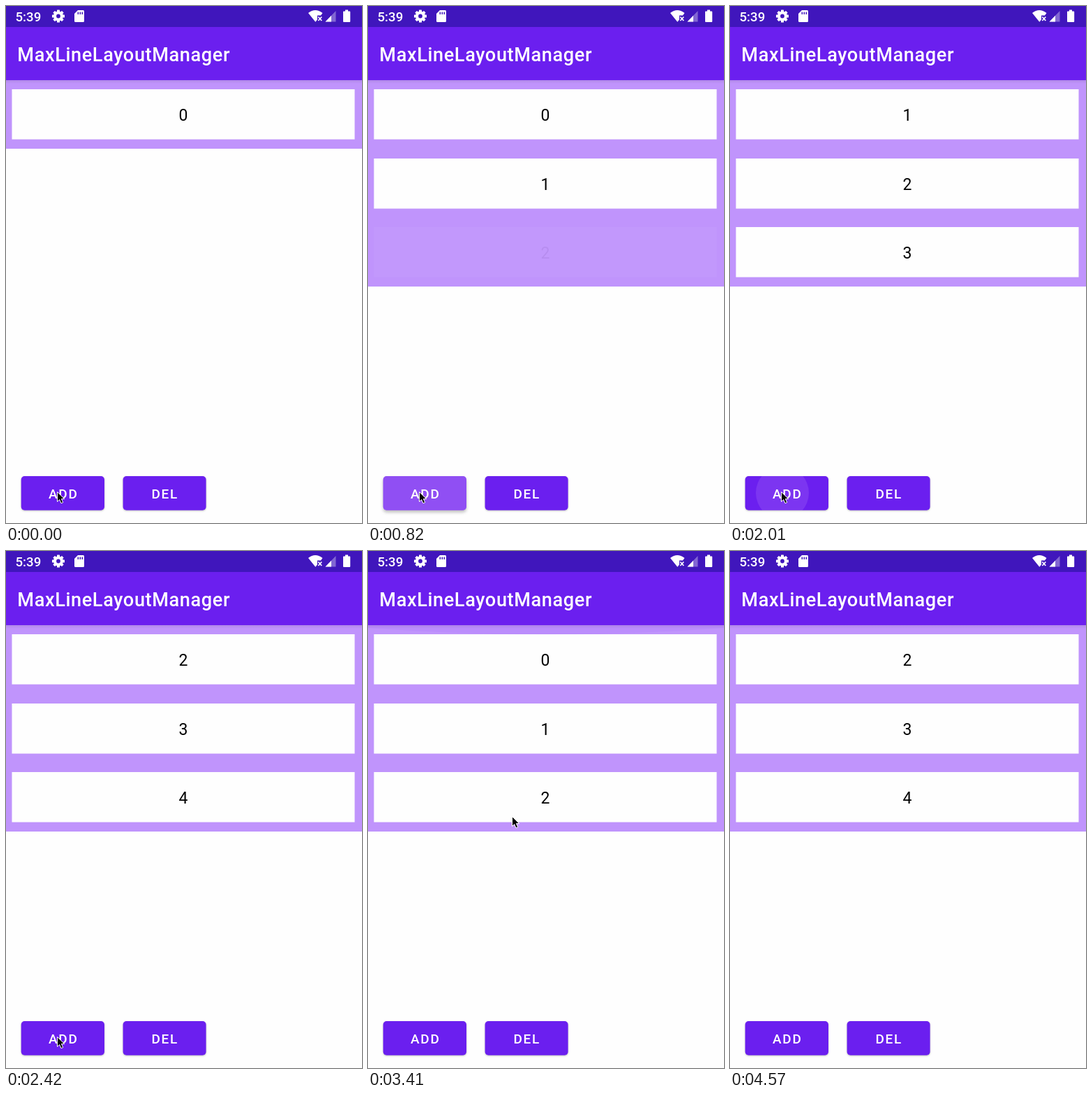
An HTML page that plays this animation: 510x739 px, repeating every 5110 ms.

```html
<!DOCTYPE html>
<html lang="en">
<head>
<meta charset="utf-8">
<title>MaxLineLayoutManager</title>
<style>
  html, body { margin: 0; width: 100%; height: 100%; overflow: hidden; background: #fefefe; }
  svg { display: block; width: 100%; height: 100%; font-family: Roboto, sans-serif; }
  .medium { font-weight: 500; fill: #fff; }
  .label { font-size: 19px; letter-spacing: 1.7px; text-anchor: middle; }
  .digit { font-size: 23px; text-anchor: middle; fill: #000; }
  .button { fill: #6b1fef; filter: drop-shadow(0 1.5px 1.2px rgba(0, 0, 0, .25)); }
</style>
</head>
<body>
<svg viewBox="0 0 510 739">
  <defs>
    <clipPath id="listClip"><rect id="listArea" y="106" width="510" height="98"/></clipPath>
    <clipPath id="addClip"><rect x="21.700" y="672" width="119.300" height="48.800" rx="5"/></clipPath>
    <linearGradient id="shade" x2="0" y2="1">
      <stop stop-opacity=".08"/><stop offset="1" stop-opacity="0"/>
    </linearGradient>
  </defs>

  <rect width="510" height="739" fill="#fefefe"/>

  <g clip-path="url(#listClip)">
    <rect y="106" width="510" height="295" fill="#c094fc"/>
    <g id="items"></g>
    <path id="topGlow" d="M0 106V110Q255 129 510 110V106Z" fill="#6b1fef"/>
    <path id="bottomGlow" d="M0 401V396.500Q255 378.500 510 396.500V401Z" fill="#6b1fef"/>
  </g>
  <rect y="106" width="510" height="5" fill="url(#shade)"/>

  <rect y="30" width="510" height="76" fill="#6b1fef"/>
  <rect width="510" height="30" fill="#4016bc"/>
  <text class="medium" x="16.300" y="79" font-size="27.140" letter-spacing=".6">MaxLineLayoutManager</text>
  <text class="medium" x="13.500" y="22" font-size="18.700">5:39</text>

  <g fill="#fff">
    <g transform="translate(75 14.500)">
      <g id="teeth"></g>
      <circle r="4.900" fill="none" stroke="#fff" stroke-width="4"/>
    </g>
    <path d="M103 6H110.500Q112 6 112 7.500V21.500Q112 23 110.500 23H99.500Q98 23 98 21.500V11Z"/>
    <path d="M103.300 8.500v3.500M106.300 8.500v3.500M109.300 8.500v3.500" stroke="#4016bc" stroke-width="1.500"/>
    <path d="M433 10Q443 2 453.500 10L451 13.500H446V19.500L443.300 22.800Z"/>
    <path d="M447.300 15.500l5 5.500m0-5.500l-5 5.500" stroke="#fff" stroke-width="1.700"/>
    <path d="M472.500 7V22.500H457.500Z" opacity=".35"/>
    <path d="M466 13.700V22.500H457.500Z"/>
    <path d="M486 5.500h4v2h2.300q.9 0 .9.900V22q0 1-1 1h-8.200q-1 0-1-1V8.400q0-.9.900-.9H486Z"/>
  </g>

  <rect id="add" class="button" x="21.700" y="672" width="119.300" height="48.800" rx="5"/>
  <g clip-path="url(#addClip)"><circle id="ripple" cy="696" fill="#fbd8ff"/></g>
  <text class="medium label" x="82.300" y="704">ADD</text>
  <rect class="button" x="167.600" y="672" width="119" height="48.800" rx="5"/>
  <text class="medium label" x="227.700" y="704">DEL</text>

  <path id="cursor" d="M.5 .5V14.500L3.700 11.600L6 16.800L8.700 15.600L6.400 10.600H10.700Z"
        fill="#000" stroke="#fff" stroke-width="1" stroke-linejoin="round"/>
</svg>

<script>
const LOOP = 5110, STEP = 54, PITCH = 98.4, END = 2 * PITCH;
const TAPS = [110, 700, 1290, 2010];
const DRAG = 2660, FLICK = 3650, GONE = 4570;
const CLICK = 103; // delay from press to the new row
const NS = "http://www.w3.org/2000/svg";
const $ = id => document.getElementById(id);

function add(parent, tag, attrs, text = "") {
  const el = document.createElementNS(NS, tag);
  set(el, attrs);
  el.textContent = text;
  return parent.appendChild(el);
}
function set(el, attrs) {
  for (const key in attrs) el.setAttribute(key, attrs[key]);
}

// Progress from 0 to 1 between two times, plain or eased.
const pass = (t, from, to) => Math.min(1, Math.max(0, (t - from) / (to - from)));
const smooth = (...args) => { const p = pass(...args); return p * p * (3 - 2 * p); };
const settle = (...args) => 1 - (1 - pass(...args)) ** 2;
const fade = (t, from, to) => t < from ? 0 : 1 - pass(t, from, to);

// The screen refreshes in even steps, counted from the latest gesture.
function refresh(t) {
  const start = [0, ...TAPS, DRAG, FLICK].filter(s => s <= t).pop();
  return start + Math.floor((t - start) / STEP) * STEP;
}

for (let i = 0; i < 8; i++) {
  add($("teeth"), "rect", { x: -2, y: -9, width: 4, height: 4, rx: .6, transform: `rotate(${i * 45})` });
}
const items = [0, 1, 2, 3, 4].map(n => {
  const g = add($("items"), "g", {});
  add(g, "rect", { x: 8.5, y: 0, width: 491, height: 71.6, fill: "#fefefe" });
  add(g, "text", { x: 254, y: 45, class: "digit" }, n);
  return g;
});

function drawList(t) {
  const births = TAPS.slice(0, 2).map(s => s + CLICK);
  const rows = 1 + births.filter(b => t >= b).length;
  set($("listArea"), { height: Math.round(rows * PITCH) });

  const jump = t >= TAPS[2] + CLICK ? PITCH : 0;
  const slide = PITCH * settle(t, TAPS[3] + CLICK, 2400);
  const back = END * smooth(t, 2992, 3340);
  const forth = END * smooth(t, FLICK - 30, 3755);
  const top = jump + slide - back + forth;

  items.forEach((g, i) => {
    const born = births[i - 1];
    set(g, {
      transform: `translate(0 ${Math.round(119.3 + i * PITCH - top)})`,
      opacity: born ? pass(t, born, born + 120) : 1
    });
  });
  set($("topGlow"), { opacity: .12 * fade(t, 3300, 3410) });
  set($("bottomGlow"), { opacity: .13 * fade(t, 3740, 4170) });
}

function drawRipple(t) {
  const tap = TAPS.filter(s => s <= t).pop() ?? -LOOP;
  const grown = pass(t, tap, tap + 2 * STEP);
  const left = fade(t, tap + 180, tap + 350) || (t < tap + 180 ? 1 : 0);
  set($("ripple"), { cx: 75 + 6 * grown, r: 38 + 38 * grown, opacity: .26 * left * (.46 + .54 * grown) });
  const lift = grown * left;
  $("add").style.filter =
    `drop-shadow(0 ${1.5 + lift * 1.5}px ${1.2 + lift}px rgba(0,0,0,.25))`;
}

function drawCursor(t) {
  const reach = smooth(t, DRAG - 50, 2992);
  const pull = pass(t, 2992, 3112);
  const flick = smooth(t, FLICK - 30, 3755);
  const leave = smooth(t, 3790, 4170);
  const exit = pass(t, 4190, GONE);
  const x = 73 + 133 * reach + flick - 7 * leave + 103 * exit;
  const y = 694 - 363 * reach + 48 * pull - 199 * flick + 473 * leave + 86 * exit;
  set($("cursor"), { transform: `translate(${Math.round(x)} ${Math.round(y)})` });
}

function draw(time) {
  const t = refresh(time);
  drawList(t);
  drawRipple(t);
  drawCursor(t);
  set($("cursor"), { visibility: time < GONE ? "visible" : "hidden" });
}

const start = performance.now();
function tick() {
  draw((performance.now() - start) % LOOP);
  requestAnimationFrame(tick);
}
draw(0);
requestAnimationFrame(tick);
</script>
</body>
</html>
```
